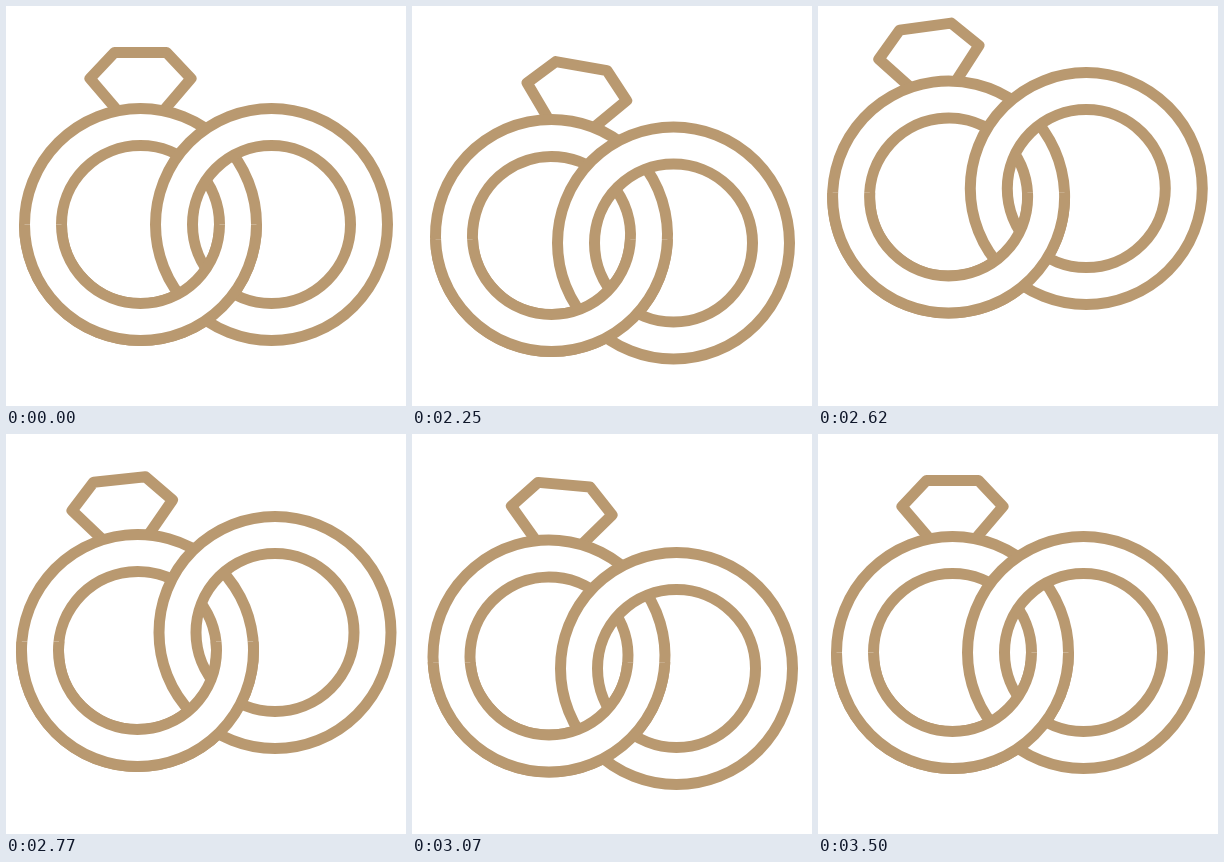
An HTML page that plays this animation: 400x400 px, repeating every 3520 ms.

```html
<!DOCTYPE html>
<html lang="en">
<head>
<meta charset="utf-8">
<title>Wedding rings</title>
<style>
  html, body { margin: 0; width: 100%; height: 100%; overflow: hidden; background: #fff; }
  svg { display: block; width: 100vw; height: 100vh; }
  .line { fill: none; stroke: #b99970; stroke-width: 11; stroke-linejoin: round; }
  .band { fill: none; stroke: #fff; stroke-width: 37; }
</style>
</head>
<body>
<svg viewBox="0 0 400 400">
  <defs>
    <g id="ring">
      <circle class="band" r="97.5"/>
      <circle class="line" r="116"/>
      <circle class="line" r="79"/>
    </g>
    <clipPath id="lower"><rect id="lowerBox" width="400" height="400"/></clipPath>
  </defs>
  <g id="left">
    <path class="line" d="M-24 -115L-50.5 -146L-26 -172H26L50.5 -146L24 -115"/>
    <use href="#ring"/>
  </g>
  <use id="right" href="#ring"/>
  <!-- the left ring passes over the right one at the lower crossing -->
  <g clip-path="url(#lower)"><use id="front" href="#ring"/></g>
</svg>
<script>
  const LOOP = 3520, START = 1994, STEP = 25, STEPS = 60;

  // [step, value] keys
  const tilt = track([[0, 0], [10, 10], [17, 0.3], [21, -6], [25.5, -7.8], [31, -6], [43, 5], [46, 5.6], [60, 0]]);
  const leftY = track([[0, 0], [7, 18], [10, 11], [17, -33], [20.5, -37.5], [31, -2], [36, 17], [43, 3.5], [52, 0], [60, 0]]);
  const rightX = track([[0, 0], [3, 0], [10, -4], [13.5, -5], [17, -4], [28, 4], [31, 3.5], [43, -1], [48, -2], [60, 0]]);
  const rightY = track([[0, 0], [9, 18.8], [10, 18.5], [17, -26], [23, -37.5], [31, -20], [39.5, 19], [43, 16], [49, 3.5], [60, 0]]);

  // Smooth curve through the keys, flat at peaks and ends
  function track(keys) {
    const slope = i => (keys[i + 1][1] - keys[i][1]) / (keys[i + 1][0] - keys[i][0]);
    const tangent = keys.map((_, i) => {
      if (i === 0 || i === keys.length - 1) return 0;
      const a = slope(i - 1), b = slope(i);
      return a * b > 0 ? 2 * a * b / (a + b) : 0;
    });
    return x => {
      let i = 0;
      while (i < keys.length - 2 && x > keys[i + 1][0]) i++;
      const [x0, y0] = keys[i], [x1, y1] = keys[i + 1];
      const h = x1 - x0, u = (x - x0) / h, v = 1 - u;
      return v * v * ((1 + 2 * u) * y0 + u * h * tangent[i])
           + u * u * ((1 + 2 * v) * y1 - v * h * tangent[i + 1]);
    };
  }

  const el = id => document.getElementById(id);
  const left = el('left'), right = el('right'), front = el('front'), lowerBox = el('lowerBox');

  function draw(now) {
    const k = Math.max(0, Math.min(STEPS, Math.floor((now % LOOP - START) / STEP)));
    const angle = tilt(k);
    const lx = 134.5 + angle / 2, ly = 218.5 + leftY(k);
    const rx = 265.5 + rightX(k), ry = 218.5 + rightY(k);
    left.setAttribute('transform', `translate(${lx} ${ly}) rotate(${angle})`);
    front.setAttribute('transform', `translate(${lx} ${ly})`);
    right.setAttribute('transform', `translate(${rx} ${ry})`);
    lowerBox.setAttribute('y', (ly + ry) / 2);
  }

  function tick() {
    draw(performance.now());
    requestAnimationFrame(tick);
  }
  tick();
</script>
</body>
</html>
```
